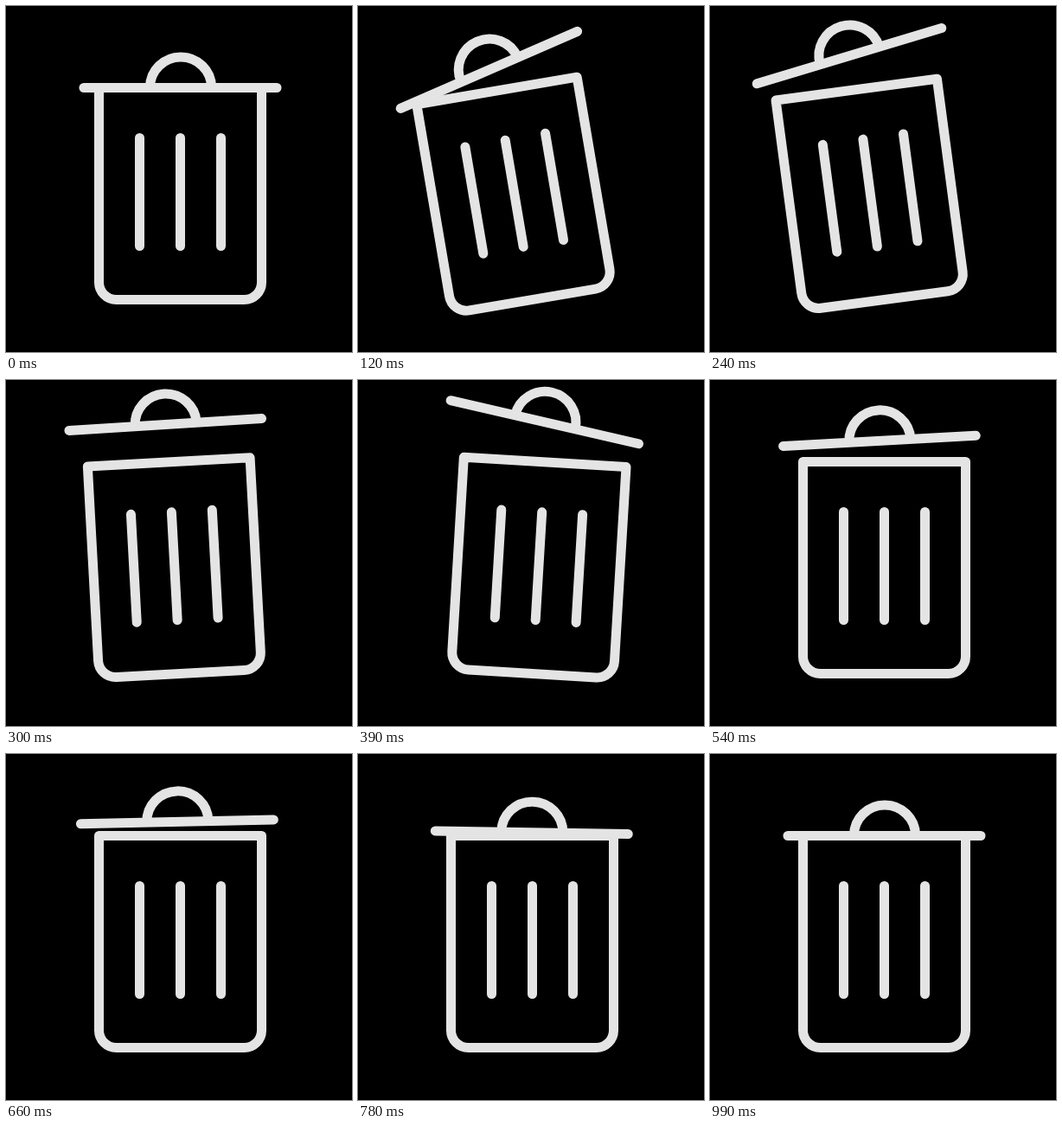
These frames come from a looping animation (400x400 px, 3020 ms). An HTML page:

```html
<!DOCTYPE html>
<html lang="en">
<head>
<meta charset="utf-8">
<title>Trash can</title>
<style>
  html, body { margin: 0; width: 100%; height: 100%; overflow: hidden; background: #000; }
  svg { display: block; width: 100vw; height: 100vh; }
  g { fill: none; stroke: #e4e4e4; stroke-width: 11; stroke-linejoin: round; }
  .round { stroke-linecap: round; }
</style>
</head>
<body>
<svg viewBox="0 0 400 400">
  <g id="can">
    <path d="M107.5 94.5H295.5V319.5a20 20 0 0 1 -20 20H127.5a20 20 0 0 1 -20 -20Z"/>
    <path class="round" d="M154.5 152.5v125m47 0v-125m47 0v125"/>
    <g id="lid">
      <path class="round" d="M90 94.5H313"/>
      <path d="M166.5 94a35.5 35 0 0 1 71 0"/>
    </g>
  </g>
</svg>
<script>
const LOOP = 3020, STEP = 30, END = 990;
const can = document.getElementById('can');
const lid = document.getElementById('lid');

function draw(now) {
  const t = Math.min(END, Math.floor(now % LOOP / STEP) * STEP);

  // Eased change by `amount` between two times.
  const move = (amount, from, to) => {
    const u = Math.min(1, Math.max(0, (t - from) / (to - from)));
    return amount * u * u * (3 - 2 * u);
  };

  // The can leans left, throws its lid to the right and straightens up.
  const tilt = move(-10, 0, 135) + move(15, 170, 445) + move(-5, 445, 540);

  // The lid opens on its left end, flies up, drops and settles.
  const swing = move(-14.7, 0, 140) + move(24.7, 165, 410) + move(-13.2, 410, 545)
    + move(4.1, 545, 780) + move(-0.9, 780, END);
  const lift = move(1.5, 0, 120) + move(-67.5, 125, 415) + move(48, 415, 540) + move(18, 540, 920);
  const shift = move(-1.6, 0, 120) + move(-3.8, 390, 540) + move(5.4, 540, 850);

  can.setAttribute('transform', `rotate(${tilt} 201.5 339)`);
  lid.setAttribute('transform', `translate(${shift} ${lift}) rotate(${swing} 90 94.5)`);
}

const start = performance.now();
function tick() {
  draw(performance.now() - start);
  requestAnimationFrame(tick);
}
tick();
</script>
</body>
</html>
```
